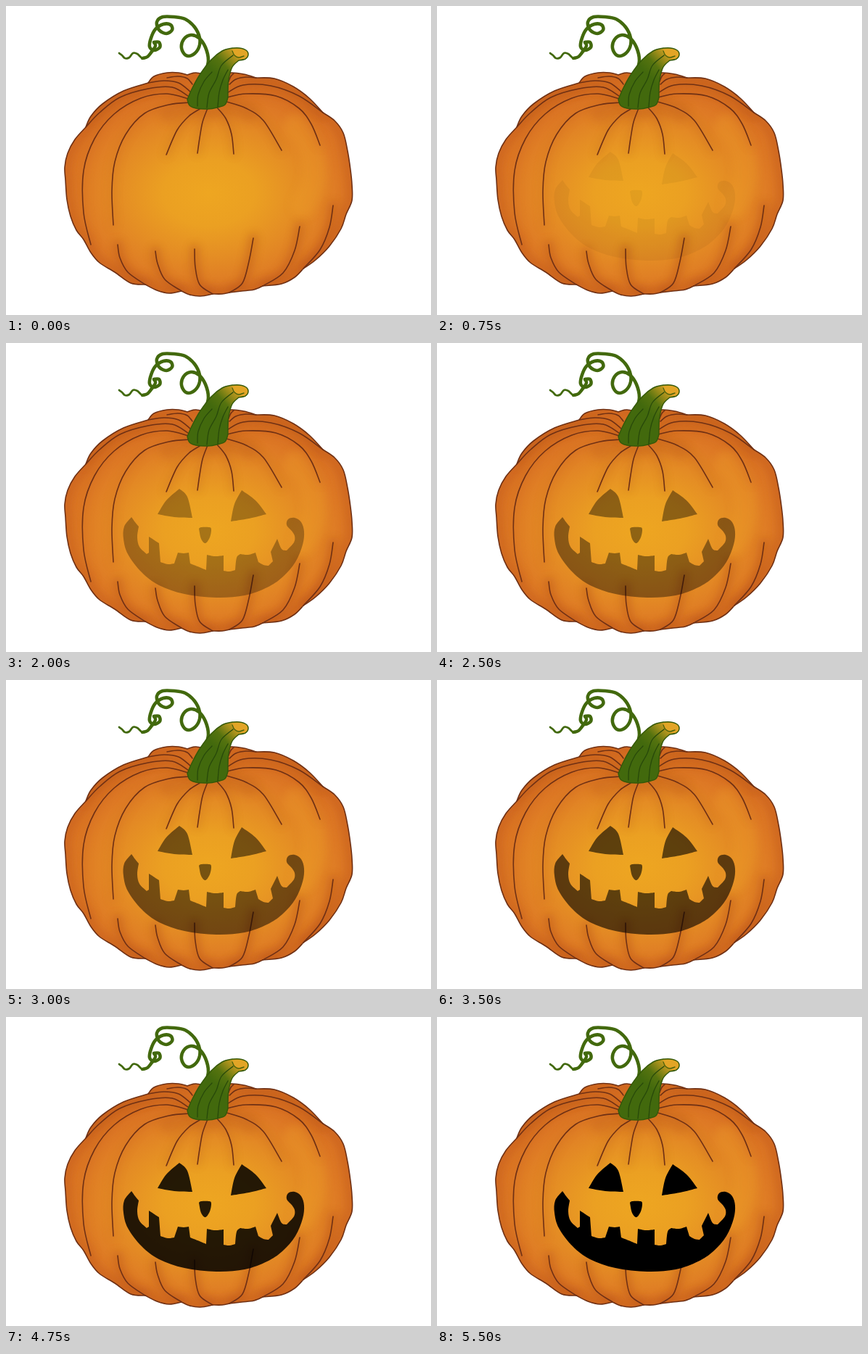
Recreate the animation shown at these times as an HTML page. Size 586 px wide and 426 px high, loop 5750 ms.

```html
<!DOCTYPE html>
<html lang="en">
<head>
<meta charset="utf-8">
<title>Pumpkin</title>
<style>
  html, body { margin: 0; width: 100%; height: 100%; overflow: hidden; background: #fff; }
  svg { display: block; width: 586px; height: 426px; }
  path { stroke-linecap: round; stroke-linejoin: round; }
</style>
</head>
<body>
<svg viewBox="0 0 586 426">
  <defs>
    <radialGradient id="skin" gradientUnits="userSpaceOnUse" cx="0" cy="0" r="1"
      gradientTransform="translate(280 258) scale(212 150)">
      <stop offset="0" stop-color="#eea621"/>
      <stop offset=".3" stop-color="#eba022"/>
      <stop offset=".6" stop-color="#e48c24"/>
      <stop offset=".85" stop-color="#de7a25"/>
      <stop offset="1" stop-color="#da7224"/>
    </radialGradient>
    <linearGradient id="bark" gradientUnits="userSpaceOnUse" x1="288" y1="92" x2="318" y2="63">
      <stop offset="0" stop-color="#42690d"/>
      <stop offset=".4" stop-color="#55730f"/>
      <stop offset="1" stop-color="#d3a022"/>
    </linearGradient>
    <filter id="soft" filterUnits="userSpaceOnUse" x="0" y="0" width="586" height="426">
      <feGaussianBlur stdDeviation="6"/>
    </filter>
    <clipPath id="inside"><path id="clip"/></clipPath>
  </defs>
  <g id="body"></g>
  <g id="shade" clip-path="url(#inside)"></g>
  <g id="ribs"></g>
  <g id="stem"></g>
  <g id="face" opacity="0"></g>
</svg>
<script>
const $ = id => document.getElementById(id);

// Smooth path through points; ";" starts a new span at the previous end, with a corner.
function curve(text) {
  let d = '', last = null;
  for (const part of text.split(';')) {
    const p = part.trim().split(/\s+/).map(s => s.split(',').map(Number));
    if (last) p.unshift(last); else d = 'M' + p[0];
    for (let i = 0; i < p.length - 1; i++) {
      const a = p[i - 1] || p[i], b = p[i], c = p[i + 1], e = p[i + 2] || c;
      const c1 = b.map((v, k) => (v + (c[k] - a[k]) / 6).toFixed(2));
      const c2 = c.map((v, k) => (v - (e[k] - b[k]) / 6).toFixed(2));
      d += `C${c1} ${c2} ${c}`;
    }
    last = p[p.length - 1];
  }
  return d;
}

function draw(id, d, attrs) {
  const el = document.createElementNS('http://www.w3.org/2000/svg', 'path');
  el.setAttribute('d', d);
  for (const k in attrs) el.setAttribute(k, attrs[k]);
  $(id).append(el);
}

const line = (color, width) => ({ fill: 'none', stroke: color, 'stroke-width': width });
const brown = line('#6f3014', 1.6);
const green = '#42690d';

const outline = curve(
  '110,167 117,152 133,135 162,117 196,106; 204,97 222,92 238,92 250,95; 262,92 285,96 310,92 328,94 345,99;' +
  '370,100 396,111 418,127 437,147; 453,158 465,175 471,200 475,226 477,246 477,268 469,287 462,307 446,331 427,350 410,362;' +
  '398,374 380,383 354,386; 342,391 325,393 308,395; 298,397 285,397; 268,400 253,398 242,393;' +
  '225,396 208,392 192,384; 172,382 150,367 129,354 117,340 107,322 97,309 89,290 84,267 82,240 81,222 85,203 95,184 110,167');
$('clip').setAttribute('d', outline);
draw('body', outline, { fill: 'url(#skin)' });

const topRibs = [
  '267,142 252,152 236,171 221,205',
  '278,141 271,160 267,182 264,203',
  '291,140 303,155 311,177 314,204',
  '304,132 331,141 355,158 380,199'
];
const sideRibs = [
  '253,133 225,136 191,148 165,177 150,215 146,255 148,302',
  '251,128 222,121 186,127 149,149 122,183 107,227 107,285 117,329',
  '251,124 229,112 196,114 157,126 129,147 110,167',
  '305,126 331,121 372,124 404,141 421,163 433,192',
  '306,119 327,109 365,110 404,124 437,147'
];
const lobes = [
  '254,118 238,106 218,103 196,106',
  '257,108 250,100 237,97 222,99',
  '308,108 317,101 331,98 345,99',
  '307,104 310,97 314,93'
];
const lowRibs = [
  '154,329 157,347 168,367 192,384',
  '206,338 209,355 219,377 242,393',
  '260,335 261,360 267,384 285,397',
  '341,320 335,352 326,382 308,395',
  '405,304 398,337 382,368 354,386',
  '451,275 446,305 433,336 410,362'
];

const blur = { filter: 'url(#soft)' };
const soft = (color, width, opacity) => ({ ...line(color, width), ...blur, opacity });
draw('shade', outline, soft('#c55f1c', 20, .5));
draw('shade', curve('255,125 225,110 190,113 150,128 120,150'), soft('#c2601c', 18, .45));
draw('shade', curve('303,120 330,105 365,106 405,122 435,142'), soft('#c2601c', 18, .4));
draw('shade', curve('225,148 250,138 280,143 310,139 335,147'), soft('#c7661b', 26, .4));
draw('shade', curve('400,165 420,195 424,240 410,275'), soft('#f0a329', 34, .3));
for (const r of topRibs) draw('shade', curve(r), soft('#b95b18', 7, .3));
for (const r of lowRibs) draw('shade', curve(r), soft('#b64f18', 13, .4));
for (const r of sideRibs) draw('shade', curve(r), soft('#c8641d', 9, .25));

draw('ribs', outline, brown);
for (const r of [...topRibs, ...sideRibs, ...lobes, ...lowRibs]) draw('ribs', curve(r), brown);

// Tendril, tapering towards its tip
const tip = '201,61 195,70 188,72 181,66 175,65 170,71 164,72 160,68 156,65';
draw('stem', curve(
  '275,92 279,75 275,57 266,44 255,40 245,46 242,58 248,68 258,67 266,57 267,44 260,29 247,18 232,15 216,15 ' +
  '208,22 211,33 221,38 229,33 227,26 217,25 206,32 200,44 198,56 204,61 212,57 211,50 204,50'), line(green, 4.6));
draw('stem', curve('204,50 206,55 201,63 195,70 188,72'), line(green, 4.4));
draw('stem', curve(tip), line(green, 2.8));
draw('stem', curve('275,92 279,75 275,57 266,44'), line(green, 3));

draw('stem', curve(
  '250,129 256,115 267,95 283,74 298,62 312,58; 322,58 331,61 334,67 330,73 321,75; 312,84 307,101 306,116 306,126;' +
  '302,136 291,140 278,142 262,141 253,137 250,129'), { fill: 'url(#bark)', stroke: '#355909', 'stroke-width': 1.5 });
draw('stem', curve('312,60 322,59 331,62 333,68 328,73 319,71 313,66 312,60'), { fill: '#e2a526' });
draw('stem', curve('312,62 315,68 321,71 328,69'), line('#4d640d', 1.4));
for (const s of ['264,138 265,122 273,104 284,91', '277,140 280,120 290,101 297,82 313,68', '292,139 294,119 299,102 306,88'])
  draw('stem', curve(s), line('#28490a', 1.3));

const mouth = curve(
  '173,240; 178,247 183,253; 181,268 184,281 194,291; 197,289; 197,267; 211,276; 213,302; 223,305 232,304; 237,289;' +
  '245,290 252,289; 254,304; 264,308 276,313; 277,292; 288,294 300,293; 300,314; 308,315 316,313; 318,296 323,291;' +
  '334,292 344,289; 348,302; 355,306 362,307; 368,301; 365,288; 374,270; 380,284 387,286; 397,275 398,266 394,259; 387,251 389,243 398,241 407,247 411,260 409,278 399,302 381,323' +
  ' 360,337 329,348 290,351 246,346 211,334 187,316 168,291 162,270 163,253 173,240');
const eyes = curve('239,201; 250,212 257,241; 232,240 209,236; 221,217 239,201') +
  curve('325,203; 344,217 359,236; 335,242 310,246; 315,222 325,203');
const nose = curve('266,256 269,254 280,254 283,257 281,268 275,276 269,270 266,256');
draw('face', mouth + eyes + nose, { fill: '#000' });

// Darkens in twenty equal steps, 250 ms apart
const loop = 5750;
$('face').animate([
  { opacity: 0, offset: 0 },
  { opacity: 0, offset: 500 / loop, easing: 'steps(21, jump-none)' },
  { opacity: 1, offset: 1 }
], { duration: loop, iterations: Infinity });
</script>
</body>
</html>
```
